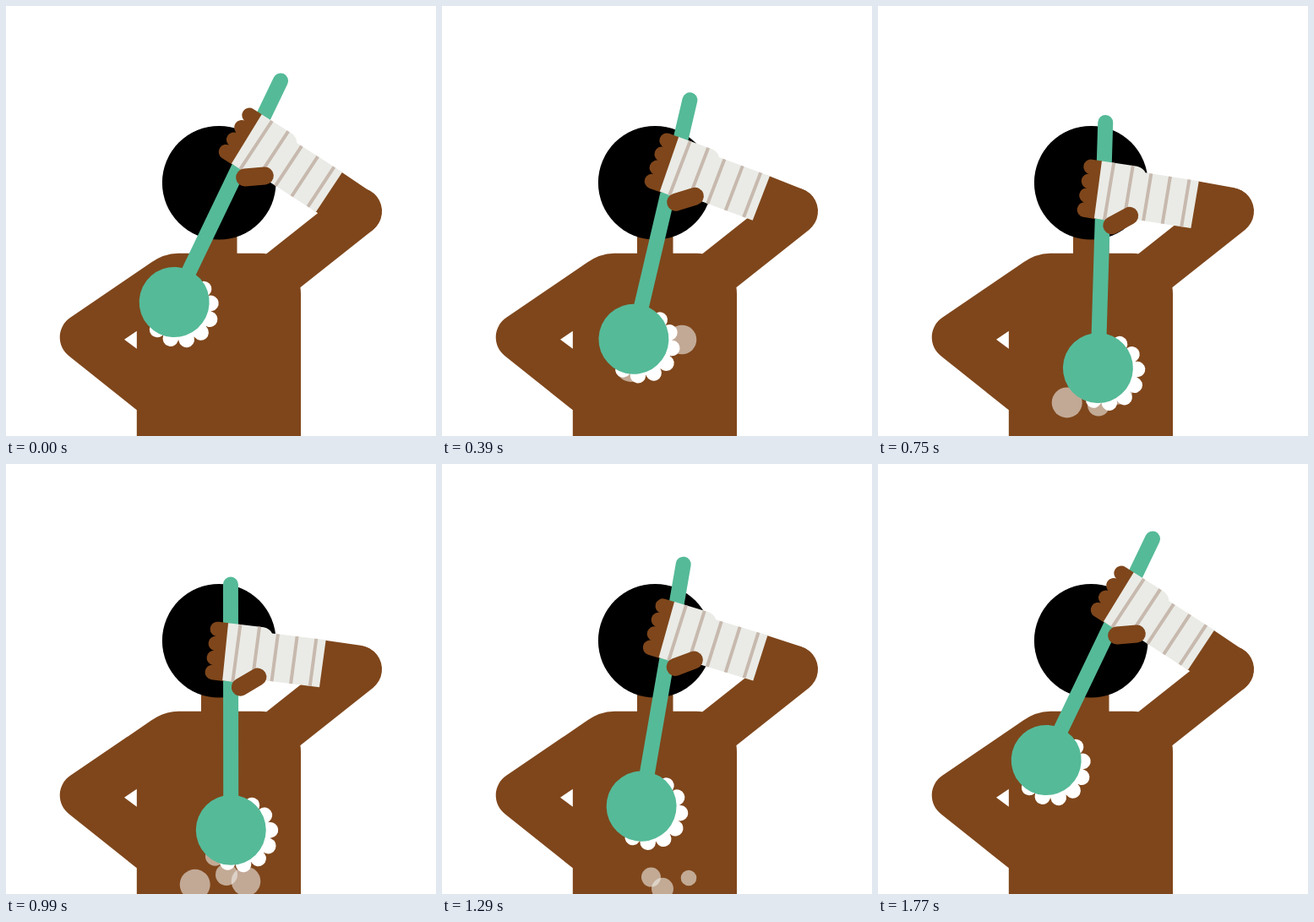
Write an HTML page that moves like this. It is 509 by 509 pixels and loops after 1800 ms.

```html
<!DOCTYPE html>
<html lang="en">
<head>
<meta charset="utf-8">
<title>Back scrub</title>
<style>
  html, body { margin: 0; width: 100%; height: 100%; overflow: hidden; background: #fff; }
  svg { display: block; width: 100%; height: 100%; }
  .skin { fill: #7f461b; }
  .limb { fill: none; stroke: #7f461b; stroke-linecap: round; }
  .foam { fill: #fff; }
  .brush { fill: #55ba98; }
  .handle { stroke: #55ba98; stroke-width: 18; stroke-linecap: round; }
  .wrap { fill: #eaebe6; }
  .stripe { fill: none; stroke: #c7b9ae; stroke-width: 4; }
  #bubbles { fill: #efece8; }
</style>
</head>
<body>
<svg viewBox="0 0 509 509">
  <defs>
    <path id="wrapShape" d="M263 188.4 L305 193.3 Q312.5 195 315 200.6 L378.6 208.4 L371 264.3 L307 256.4 H297 L276 259 L256.2 256.4 Z"/>
    <clipPath id="wrapClip"><use href="#wrapShape"/></clipPath>
  </defs>

  <rect class="skin" x="231" y="250" width="42.5" height="60"/>
  <circle cx="252.2" cy="209.2" r="67.3"/>
  <path class="skin" d="M76.2 368.8 L172 303.6 A56 56 0 0 1 204 292.7 H301 A48 48 0 0 1 349 340.7 V509 H154.8 V478.3 L74.5 414.2 A28 28 0 0 1 76.2 368.8 Z"/>
  <path class="foam" d="M140 394.7 L154.8 384.8 V405.7 Z"/>
  <path class="limb" stroke-width="56" d="M310 327.8 L417 243"/>

  <g id="bubbles"></g>

  <g id="arm">
    <g id="foam" class="foam" transform="translate(266.5 433.5) rotate(23) translate(11.3 0)"></g>
    <path class="handle" d="M265.8 142.8 L266.5 433.5"/>
    <circle class="brush" cx="266.5" cy="433.5" r="41.5"/>
    <path class="limb" stroke-width="56" d="M374 236.4 L415.6 242.4"/>
    <path id="fingers" class="limb" stroke-width="17.5"/>
    <use class="wrap" href="#wrapShape"/>
    <path id="stripes" class="stripe" clip-path="url(#wrapClip)"/>
    <path class="limb" stroke-width="21" d="M277.4 264.3 L297.9 252.2"/>
  </g>
</svg>
<script>
  const LOOP = 1800, STEP = 30;
  const HIGH = 25.8, LOW = -2.9;
  const TURN = 900, LAST = LOOP - STEP;
  const FLOOR = 509, LIFE = 800, FADE = 100;

  const byId = id => document.getElementById(id);
  const mix = (a, b, p) => a + (b - a) * p;
  const repeat = (count, make) => Array.from({ length: count }, (_, i) => make(i));

  function addCircle(parent, attrs) {
    const el = document.createElementNS('http://www.w3.org/2000/svg', 'circle');
    for (const name in attrs) el.setAttribute(name, attrs[name]);
    return byId(parent).appendChild(el);
  }

  // Foam: a disc edged with a half ring of scallops
  const RING = 36.5;
  addCircle('foam', { r: RING });
  for (let a = -90; a <= 90; a += 30) {
    addCircle('foam', { cx: RING, r: 9.3, transform: `rotate(${a})` });
  }

  byId('fingers').setAttribute('d',
    repeat(4, i => `M${250.3 - i * 2} ${195.7 + i * 17} l12 1.5`).join(' '));
  byId('stripes').setAttribute('d',
    repeat(5, i => `M${278.4 + i * 22.5} ${182 + i * 4} l-10.6 80`).join(' '));

  // Each bubble falls steadily and reaches the floor at its own time
  const bubbles = [
    { x: 284, r: 17.3, speed: 0.165, lands: 1081 },
    { x: 223.7, r: 18, speed: 0.118, lands: 1085 },
    { x: 261, r: 13, speed: 0.056, lands: 1400 },
    { x: 292, r: 9.3, speed: 0.133, lands: 1433 },
    { x: 247.5, r: 11.5, speed: 0.083, lands: 1530 }
  ];
  for (const b of bubbles) b.el = addCircle('bubbles', { cx: b.x, r: b.r });

  function drawBubble({ el, speed, lands }, t) {
    const age = t - lands + LIFE;
    el.setAttribute('cy', FLOOR + speed * (t - lands));
    el.setAttribute('opacity', 0.6 * Math.min(1, Math.max(0, age / FADE)));
  }

  function draw(t) {
    const angle = t < TURN
      ? mix(HIGH, LOW, t / TURN)
      : mix(LOW, HIGH, (t - TURN) / (LAST - TURN));
    byId('arm').setAttribute('transform', `rotate(${angle} 414 245)`);
    for (const b of bubbles) drawBubble(b, t);
  }

  const begin = performance.now();
  function tick() {
    const t = (performance.now() - begin) % LOOP;
    draw(Math.floor(t / STEP) * STEP);
    requestAnimationFrame(tick);
  }
  tick();
</script>
</body>
</html>
```
